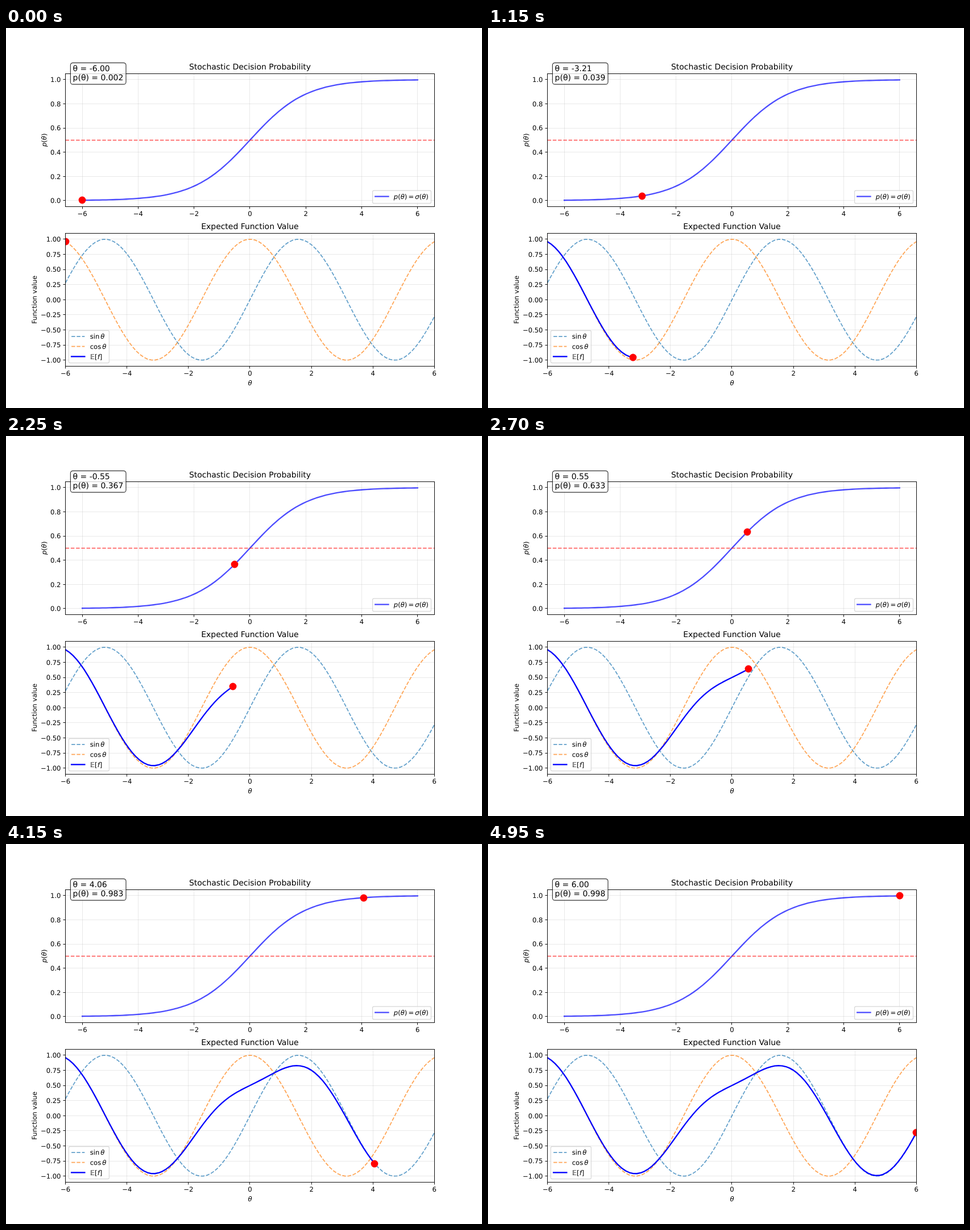
An HTML page that plays this animation: 837 px wide and 669 px high, repeating every 5 s.

```html
<!DOCTYPE html>
<html lang="en">
<head>
<meta charset="utf-8">
<title>Stochastic decision</title>
<style>
  html, body { margin: 0; width: 100%; height: 100%; overflow: hidden; background: #fff; }
  svg { display: block; }
  text { font: 11.625px "DejaVu Sans", sans-serif; fill: #000; text-rendering: geometricPrecision; white-space: pre; }
  .big { font-size: 13.95px; }
  .mid { text-anchor: middle; }
  .end { text-anchor: end; }
  .it { font-style: italic; }
  .line { fill: none; stroke-width: 2.325; stroke-linejoin: round; stroke-linecap: square; }
  .dash { fill: none; stroke-width: 1.744; stroke-dasharray: 6.453 2.79; stroke-opacity: .7; }
  .grid { stroke: #b0b0b0; stroke-opacity: .3; stroke-width: .93; }
  .axis { fill: none; stroke: #000; stroke-width: .93; }
  .legend { fill: #fff; fill-opacity: .8; stroke: #ccc; stroke-opacity: .8; stroke-width: 1.1625; }
  .note { fill: #fff; fill-opacity: .8; stroke: #000; stroke-opacity: .8; stroke-width: 1.1625; }
</style>
</head>
<body>
<svg id="stage" width="837" height="669" viewBox="0 0 837 669"></svg>
<script>
const COUNT = 100, STEP = 50, EM = 11.625;
const LEFT = 104.625, WIDTH = 648.675, HEIGHT = 234.15;
const BLUE = '#1f77b4', ORANGE = '#ff7f0e';
const stage = document.getElementById('stage');

function add(tag, attrs, parent = stage) {
  const el = document.createElementNS('http://www.w3.org/2000/svg', tag);
  for (const k in attrs) el.setAttribute(k, attrs[k]);
  parent.appendChild(el);
  return el;
}
function label(x, y, str, cls = '', extra = {}) {
  const el = add('text', { x, y, class: cls, ...extra });
  el.innerHTML = str;
  return el;
}
const snap = v => Math.floor(v) + .5;
const minus = s => s.replace('-', '\u2212');
const it = s => `<tspan class="it">${s}</tspan>`;

// A panel maps data to pixels; xr and yr are half ranges around its centre.
function panel(top, xr, yMid, yr) {
  return {
    top,
    x: v => LEFT + WIDTH * (v + xr) / (2 * xr),
    y: v => top + HEIGHT * (yMid + yr - v) / (2 * yr)
  };
}
const upper = panel(80.28, 6.6, .5, .55);
const lower = panel(361.26, 6, 0, 1.1);

const thetas = Array.from({ length: COUNT }, (_, i) => -6 + 12 * i / (COUNT - 1));
const sigma = v => 1 / (1 + Math.exp(-v));
const mean = v => sigma(v) * Math.sin(v) + (1 - sigma(v)) * Math.cos(v);
const trace = (p, f, xs = thetas) =>
  'M' + xs.map(v => p.x(v).toFixed(2) + ' ' + p.y(f(v)).toFixed(2)).join('L');

function drawGrid(p, yTicks, digits) {
  const bottom = p.top + HEIGHT, right = LEFT + WIDTH;
  for (let v = -6; v <= 6; v += 2) {
    const x = snap(p.x(v)), b = snap(bottom);
    add('path', { class: 'grid', d: `M${x} ${p.top}V${bottom}` });
    add('path', { class: 'axis', d: `M${x} ${b}v4.07` });
    label(p.x(v), bottom + 16.95, minus(String(v)), 'mid');
  }
  for (const v of yTicks) {
    const y = snap(p.y(v));
    add('path', { class: 'grid', d: `M${LEFT} ${y}H${right}` });
    add('path', { class: 'axis', d: `M${snap(LEFT)} ${y}h-4.07` });
    label(LEFT - 8.14, p.y(v) + 4.3, minus(v.toFixed(digits)), 'end');
  }
}
function drawFrame(p) {
  const x = snap(LEFT), y = snap(p.top);
  add('rect', {
    class: 'axis', x, y,
    width: snap(LEFT + WIDTH) - x, height: snap(p.top + HEIGHT) - y
  });
}
function title(p, str) {
  label(LEFT + WIDTH / 2, p.top - 6.98, str, 'big mid');
}
function sideLabel(x, p, str) {
  label(0, 0, str, 'mid', { transform: `translate(${x} ${p.top + HEIGHT / 2}) rotate(-90)` });
}
function legendBox(x, y, width, height) {
  add('rect', { class: 'legend', x, y, width, height, rx: 2.3 });
}
function key(x, y, cls, stroke, str, opacity) {
  const el = add('path', { class: cls, stroke, d: `M${x} ${y}h23.25` });
  if (opacity) el.setAttribute('stroke-opacity', opacity);
  label(x + 32.55, y + 4.1, str);
}
const dot = group => add('circle', { r: 6.4, fill: '#f00' }, group);

const clip = add('clipPath', { id: 'inside' }, add('defs', {}));
add('rect', { x: 105, y: 361.5, width: 648.5, height: 234 }, clip);

// Upper panel
drawGrid(upper, [0, .2, .4, .6, .8, 1], 1);
add('path', { class: 'line', stroke: '#00f', 'stroke-opacity': .7, d: trace(upper, sigma) });
add('path', { class: 'dash', stroke: '#f00', d: `M${LEFT} ${snap(upper.y(.5))}h${WIDTH}` });
const topDot = dot(stage);
drawFrame(upper);
title(upper, 'Stochastic Decision Probability');
sideLabel(70.8, upper, `${it('p')}(${it('θ')})`);
add('rect', { class: 'note', x: 113.4, y: 61.3, width: 97.6, height: 37.9, rx: 4.2 });
const thetaText = label(117.6, 76.1, '', 'big');
const probText = label(117.6, 92, '', 'big');
legendBox(644.6, 286.2, 102.9, 22.5);
key(649.25, 296.6, 'line', '#00f',
  `${it('p')}(${it('θ')})<tspan dx="2.1">=</tspan><tspan dx="2.1" class="it">σ</tspan>(${it('θ')})`, .7);

// Lower panel
drawGrid(lower, [-1, -.75, -.5, -.25, 0, .25, .5, .75, 1], 2);
const plot = add('g', { 'clip-path': 'url(#inside)' });
add('path', { class: 'dash', stroke: BLUE, d: trace(lower, Math.sin) }, plot);
add('path', { class: 'dash', stroke: ORANGE, d: trace(lower, Math.cos) }, plot);
const meanLine = add('path', { class: 'line', stroke: '#00f' }, plot);
const lowDot = dot(plot);
drawFrame(lower);
title(lower, 'Expected Function Value');
sideLabel(53.8, lower, 'Function value');
label(LEFT + WIDTH / 2, 628.9, 'θ', 'mid it');
legendBox(110.4, 532.6, 71, 57);
const thin = `<tspan dx="${EM / 6}" class="it">θ</tspan>`;
key(115.1, 543.1, 'dash', BLUE, 'sin' + thin);
key(115.1, 560.6, 'dash', ORANGE, 'cos' + thin);
key(115.1, 578.4, 'line', '#00f', `𝔼[${it('f')}]`);

function place(el, p, v, f) {
  el.setAttribute('cx', Math.round(p.x(v)));
  el.setAttribute('cy', Math.round(p.y(f(v))));
}
let shown = -1;
function draw(ms) {
  const i = Math.floor(ms / STEP + .01) % COUNT;
  if (i === shown) return;
  shown = i;
  const v = thetas[i];
  place(topDot, upper, v, sigma);
  place(lowDot, lower, v, mean);
  meanLine.setAttribute('d', i ? trace(lower, mean, thetas.slice(0, i + 1)) : '');
  thetaText.textContent = `θ = ${v.toFixed(2)}`;
  probText.textContent = `p(θ) = ${sigma(v).toFixed(3)}`;
}
function tick() {
  draw(performance.now());
  requestAnimationFrame(tick);
}
draw(0);
requestAnimationFrame(tick);
</script>
</body>
</html>
```
